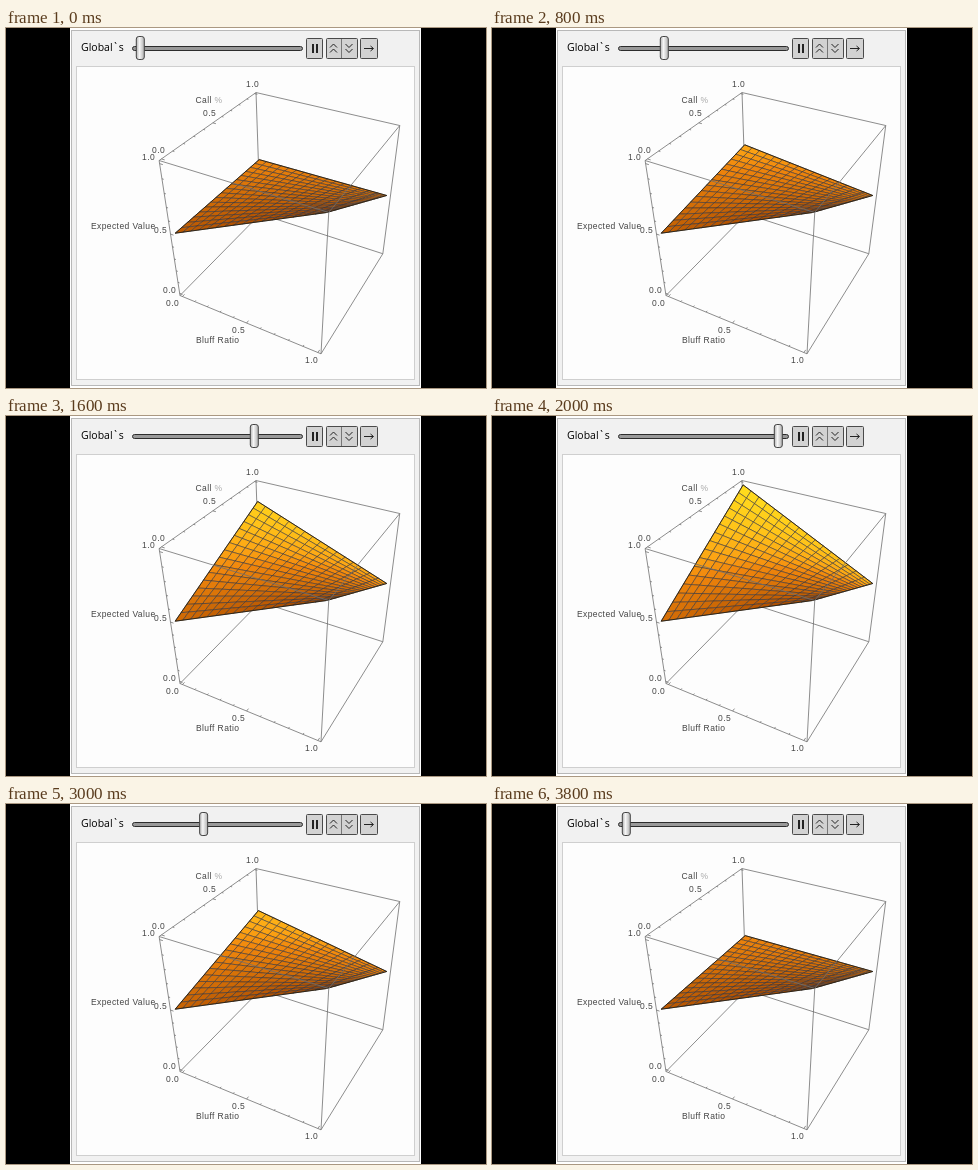
An HTML page for the animation above (4100 ms loop, 480 by 360 pixels).

```html
<!DOCTYPE html>
<html lang="en">
<head>
<meta charset="utf-8">
<title>Expected value surface</title>
<style>
  html, body { margin: 0; width: 100%; height: 100%; overflow: hidden; background: #000; }
  svg { display: block; width: 100vw; height: 100vh; }
  .labels text { font: 8.5px "Liberation Sans", Arial, sans-serif; letter-spacing: .4px; fill: #444; }
  .title { font: 10.5px "Open Sans", "Noto Sans", sans-serif; fill: #000; }
  .button { fill: #d2d2d2; stroke: #4a4a4a; }
  .icon { fill: none; stroke: #222; stroke-width: 1; }
  .icon.bold { stroke-width: 2; }
  .icon.divider { stroke: #777; }
  .edges { fill: none; stroke: #707070; stroke-width: .8; }
  .mesh { stroke: #33333c; stroke-width: .55; stroke-linejoin: round; }
  .outline { fill: none; stroke: #2a2010; stroke-width: .9; stroke-linejoin: round; }
</style>
</head>
<body>
<svg viewBox="0 0 480 360">
  <defs>
    <linearGradient id="metal">
      <stop offset="0" stop-color="#b4b4b4"/>
      <stop offset=".4" stop-color="#f6f6f6"/>
      <stop offset="1" stop-color="#b0b0b0"/>
    </linearGradient>
  </defs>
  <rect width="480" height="360"/>
  <rect x="64" width="351" height="360" fill="#fff"/>
  <rect x="65.5" y="2.5" width="348" height="355" fill="#f1f1f1" stroke="#b8b8b8"/>
  <rect x="70.5" y="38.5" width="338" height="313" fill="#fdfdfd" stroke="#cfcfcf"/>

  <text class="title" x="75" y="23">Global`s</text>
  <rect x="126.5" y="18.5" width="170" height="4" rx="2" fill="#999" stroke="#2c2c2c"/>
  <rect id="thumb" x="-4" y="8.5" width="8" height="23" rx="2.5" fill="url(#metal)" stroke="#444"/>

  <rect class="button" x="300.5" y="10.5" width="16" height="20" rx="1"/>
  <rect class="button" x="320.5" y="10.5" width="31" height="20" rx="1"/>
  <rect class="button" x="354.5" y="10.5" width="17" height="20" rx="1"/>
  <path class="icon divider" d="M335.5 11V30"/>
  <path class="icon bold" d="M307 16V25M311 16V25"/>
  <path class="icon" d="M324 19.5L327.5 16L331 19.5M324 24.5L327.5 21L331 24.5"/>
  <path class="icon" d="M339.5 16L343 19.5L346.5 16M339.5 21L343 24.5L346.5 21"/>
  <path class="icon" d="M358 20.5H367M364.5 18L367.5 20.5L364.5 23"/>

  <g transform="translate(0 .5)">
    <path class="edges" id="back"/>
    <g class="mesh" id="mesh"></g>
    <polygon class="outline" id="outline"/>
    <path class="edges" id="front"/>
  </g>

  <g class="labels">
    <text x="240" y="59">1.0</text>
    <text x="189.5" y="75">Call <tspan fill="#aaa">%</tspan></text>
    <text x="197" y="88">0.5</text>
    <text x="146" y="125">0.0</text>
    <text x="136" y="132">1.0</text>
    <text x="85" y="201">Expected Value</text>
    <text x="148" y="205">0.5</text>
    <text x="157" y="265">0.0</text>
    <text x="160" y="278">0.0</text>
    <text x="226" y="305">0.5</text>
    <text x="190" y="315">Bluff Ratio</text>
    <text x="299" y="335">1.0</text>
  </g>
</svg>
<script>
const byId = id => document.getElementById(id);
const CELLS = 16, LEVELS = 12, STEPS = 17, LOOP = 4100;

// Perspective given by the box origin and one weighted vanishing point per axis.
const ORIGIN = [174, 267];
const AXES = [[-1023, -228, -.10538], [649.4, -216, .2029], [280.5, 955, -.164]];

function project(box) {
  let [x, y] = ORIGIN, w = 1;
  AXES.forEach(([vx, vy, k], i) => {
    const m = k * box[i];
    x += vx * m;
    y += vy * m;
    w += m;
  });
  return (x / w).toFixed(2) + ',' + (y / w).toFixed(2);
}

// The plotted range leaves a 2% margin inside the box.
const pad = v => (v + .02) / 1.04;
const line = (a, b) => `M${project(a)}L${project(b)}`;

function edgesAt(corner) {
  return [0, 1, 2].map(i => {
    const other = corner.slice();
    other[i] = 1 - other[i];
    return line(corner, other);
  }).join('');
}

function ticks(base, along, into) {
  let d = '';
  for (let i = 0; i <= 10; i++) {
    const a = base.slice();
    a[along] = pad(i / 10);
    const b = a.slice();
    b[into] += i % 5 ? .012 : .022;
    d += line(a, b);
  }
  return d;
}

byId('back').setAttribute('d', edgesAt([0, 1, 0]) +
  ticks([0, 0, 1], 1, 0) + ticks([0, 0, 0], 0, 1) + ticks([0, 0, 0], 2, 0));
byId('front').setAttribute('d', edgesAt([1, 0, 1]) +
  line([0, 0, 0], [0, 0, 1]) + line([0, 0, 0], [1, 0, 0]) + line([0, 0, 1], [0, 1, 1]) +
  line([1, 1, 0], [1, 1, 1]) + line([0, 1, 1], [1, 1, 1]) + line([1, 0, 0], [1, 1, 0]));

const height = (b, c, s) => .5 + .5 * (b * (1 - c) + s * c * (1 - b));

const RAMP = [[.1, 176, 80, 0], [.5, 240, 134, 12], [.6, 252, 165, 20],
  [.75, 255, 195, 25], [1, 255, 226, 30]];

// Light depends on how the surface tilts along each axis.
function shade(b, c, s) {
  const slopeB = .5 * (1 - c - s * c), slopeC = .5 * (s * (1 - b) - b);
  const t = Math.min(1, Math.max(.1, .5 - .65 * slopeB + .3 * slopeC));
  const i = Math.max(1, RAMP.findIndex(stop => t <= stop[0]));
  const lo = RAMP[i - 1], hi = RAMP[i], f = (t - lo[0]) / (hi[0] - lo[0]);
  return `rgb(${[1, 2, 3].map(n => Math.round(lo[n] + (hi[n] - lo[n]) * f))})`;
}

// Cells run from the far corner towards the viewer.
const cells = [];
for (let j = CELLS - 1; j >= 0; j--) {
  for (let i = 0; i < CELLS; i++) {
    const node = document.createElementNS('http://www.w3.org/2000/svg', 'polygon');
    byId('mesh').append(node);
    cells.push({ node, i, j });
  }
}

function draw(s) {
  const point = (i, j) => {
    const b = i / CELLS, c = j / CELLS;
    return project([b, c, height(b, c, s)].map(pad));
  };
  const quad = (i, j, size) =>
    [point(i, j), point(i + size, j), point(i + size, j + size), point(i, j + size)].join(' ');
  for (const { node, i, j } of cells) {
    node.setAttribute('points', quad(i, j, 1));
    node.setAttribute('fill', shade((i + .5) / CELLS, (j + .5) / CELLS, s));
  }
  byId('outline').setAttribute('points', quad(0, 0, CELLS));
  byId('thumb').setAttribute('transform', `translate(${134.3 + 152 * s})`);
}

let shown = -1;
function tick() {
  const slot = Math.floor(performance.now() % LOOP / 100);
  const step = Math.max(0, Math.min(slot - 3, 38 - slot));
  const level = Math.floor(LEVELS * step / STEPS);
  if (level !== shown) draw((shown = level) / LEVELS);
  requestAnimationFrame(tick);
}
tick();
</script>
</body>
</html>
```
